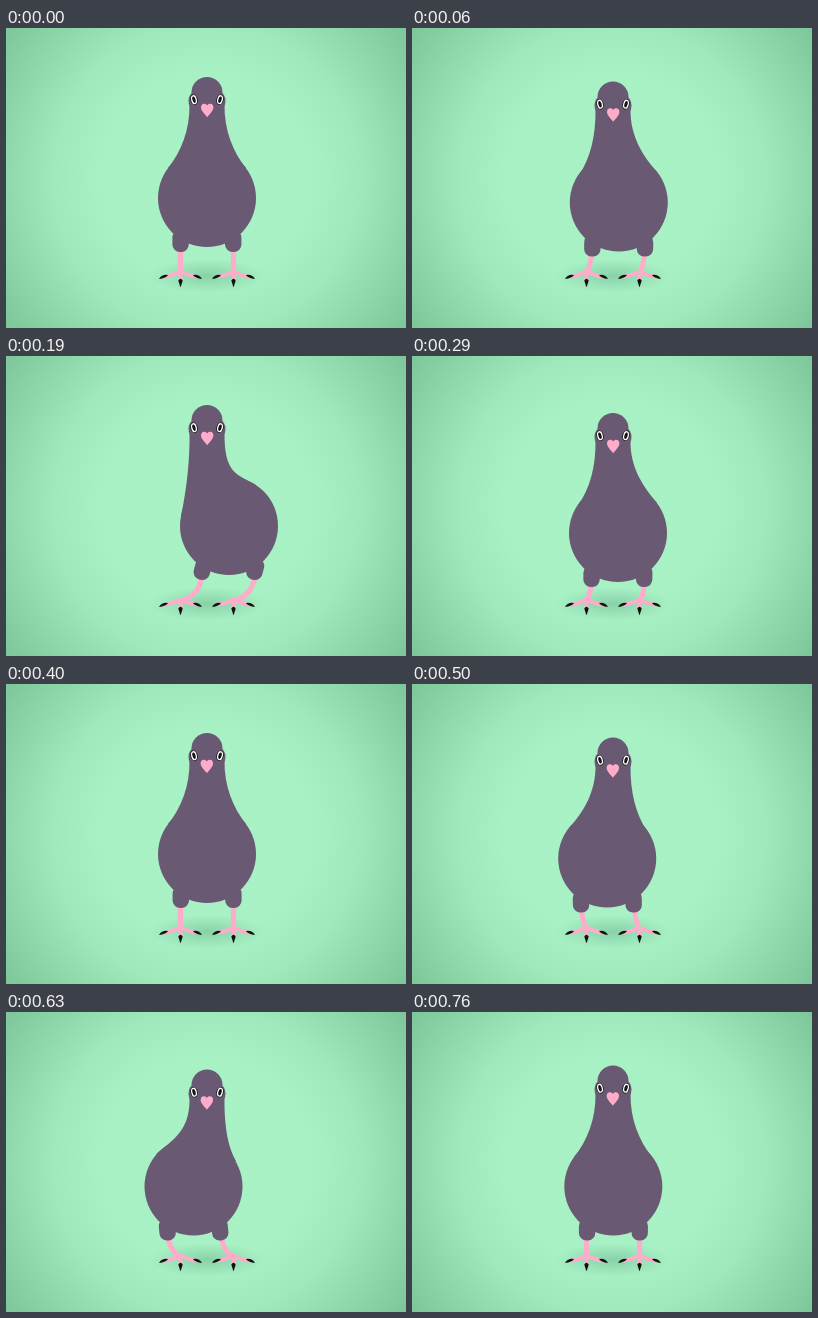
Write an HTML page without scripts that moves like this. It is 400 by 300 pixels and loops after 0.81 s.

```html
<!DOCTYPE html>
<html lang="en">
<head>
<meta charset="utf-8">
<title>Dancing pigeon</title>
<style>
html, body { margin: 0; width: 100%; height: 100%; overflow: hidden; }
body { background: radial-gradient(circle 250px at 50% 50%, #a8f2c6 0%, #a7f1c5 42%, #9ee8bc 62%, #8fd8ac 80%, #7dc69a 100%); }
svg { display: block; width: 400px; height: 300px; }

/* --x: body sway, --b: body drop, --h: head drop; the second half is mirrored */
.bird {
  fill: #6a5972;
  transform-origin: 201px 0;
  animation: dance 810ms step-end infinite, flip 810ms step-end infinite;
}
.head { transform: translateY(calc(var(--h) * 1px)); }
.belly { transform: translate(calc(var(--x) * 1px), calc(var(--b) * 1px)); }
.thigh {
  transform-box: fill-box;
  transform-origin: center;
  transform: translate(calc(var(--x) * 1px), calc(var(--b) * 1px)) rotate(calc(var(--x) * var(--x) * .03deg));
}
.neck { d: var(--neck); }
.leg { d: var(--leg); fill: none; stroke: #ffaccb; stroke-width: 5.2; }
.toes { fill: none; stroke: #ffaccb; stroke-width: 3.8; stroke-linejoin: round; }
.eye { fill: #111; stroke: #fff; stroke-width: 1.3; }

@keyframes flip {
  0% { transform: none; }
  40.74%, 100% { transform: scaleX(-1); }
}
@keyframes dance {
  0%, 40.74%, 100% {
    --x: 0; --b: 0; --h: 0;
    --neck: path("M183.5 76C184 102 175 124 162 140L240 140C227 124 218 102 218.5 76Z");
    --leg: path("M174.5 245Q174.5 240 174.5 215");
  }
  3.7%, 55.55% {
    --x: 1.4; --b: 4; --h: 4;
    --neck: path("M183.5 80C184 106 176 128 164 144L241 144C228 128 218 106 218.5 80Z");
    --leg: path("M174.5 245Q176 240 176 218");
  }
  7.4%, 59.25% {
    --x: 5.8; --b: 4.5; --h: 4.5;
    --neck: path("M183.5 81C184 108 178 131 167 147L245 144C231 128 218 108 218.5 81Z");
    --leg: path("M174.5 245Q179 239 180 218");
  }
  11.11%, 62.96% {
    --x: 12.4; --b: 3; --h: 3;
    --neck: path("M183.5 79C184 106 179 132 170 150L248 138C228 121 218 111 218.5 79Z");
    --leg: path("M174.5 245Q185 239 187 217");
  }
  14.81%, 66.66% {
    --x: 22; --b: 0; --h: 0;
    --neck: path("M183.5 76C184 102 181 132 175 160L250 129C231 118 218 118 218.5 76Z");
    --leg: path("M174.5 245Q194 240 197 216");
  }
  29.62%, 77.77% {
    --x: 13.5; --b: 4.5; --h: 8.5;
    --neck: path("M183.5 85C184 110 181 135 172 149L252 142C229 124 218 114 218.5 85Z");
    --leg: path("M174.5 245Q186 239 188 219");
  }
  33.33%, 81.48% {
    --x: 5; --b: 7; --h: 8;
    --neck: path("M183.5 84C184 110 178 133 166 149L245 147C231 130 218 112 218.5 84Z");
    --leg: path("M174.5 245Q179 239 180 220");
  }
  37.03%, 85.18% {
    --x: -.3; --b: 4.5; --h: 4.5;
    --neck: path("M183.5 81C184 107 175 129 162 145L240 145C227 129 218 107 218.5 81Z");
    --leg: path("M174.5 245Q174.5 240 174.5 218");
  }
}
</style>
</head>
<body>
<svg viewBox="0 0 400 300">
  <defs>
    <radialGradient id="shade">
      <stop offset="0" stop-color="#4d9a70" stop-opacity=".36"/>
      <stop offset="1" stop-color="#4d9a70" stop-opacity="0"/>
    </radialGradient>
    <g id="foot">
      <path class="toes" d="M158 249Q169 247 174.5 243Q180 247 191 249M174.5 243V253"/>
      <g fill="#111">
        <path id="claw" d="M153 251Q156 246 162 247Q160 250 153 251Z"/>
        <use href="#claw" transform="matrix(-1 0 0 1 349 0)"/>
        <path d="M172.3 252.5Q174.5 249 176.7 252.5L174.7 259H174.3Z"/>
      </g>
    </g>
  </defs>
  <ellipse cx="201" cy="248" rx="58" ry="17" fill="url(#shade)"/>
  <g class="bird">
    <path class="leg"/>
    <path class="leg" transform="translate(53)"/>
    <use href="#foot"/>
    <use href="#foot" x="53"/>
    <rect class="thigh" x="166.4" y="202" width="16.4" height="22" rx="7.5"/>
    <rect class="thigh" x="219" y="202" width="16.4" height="22" rx="7.5"/>
    <circle class="belly" cx="201" cy="170" r="49"/>
    <path class="neck"/>
    <g class="head">
      <rect x="185.5" y="49" width="31" height="36" rx="15.5"/>
      <ellipse cx="188.3" cy="73" rx="5.8" ry="9"/>
      <ellipse cx="213.7" cy="73" rx="5.8" ry="9"/>
      <g id="eye" transform="rotate(-14 188 71.7)">
        <ellipse cx="188" cy="71.7" rx="3.6" ry="5.4" fill="#111"/>
        <ellipse class="eye" cx="188" cy="71.7" rx="2.2" ry="4"/>
      </g>
      <use href="#eye" transform="matrix(-1 0 0 1 402 0)"/>
      <path fill="#ffaccb" d="M201.2 89.2C199 86.5 195 83 195 79.3C195 75 200 75 201.2 77.5C202.4 75 207.4 75 207.4 79.3C207.4 83 203.4 86.5 201.2 89.2Z"/>
    </g>
  </g>
</svg>
</body>
</html>
```
